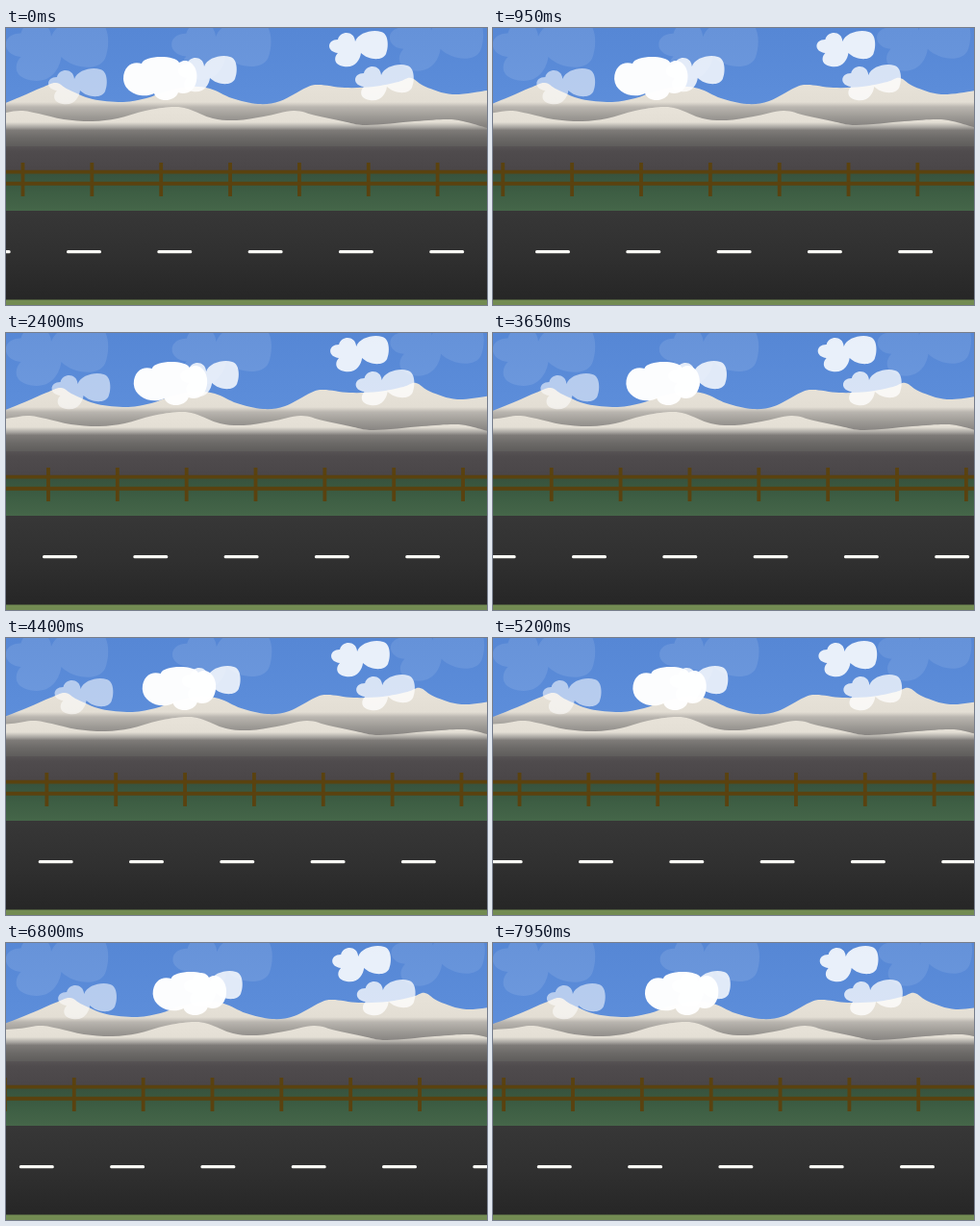
An HTML page that plays this animation: 500x288 px, repeating every 8 s.

```html
<!DOCTYPE html>
<html lang="en">
<head>
<meta charset="utf-8">
<title>Roadside parallax</title>
<style>
html, body { margin: 0; width: 100%; height: 100%; overflow: hidden; background: #2b2b2b; }
svg { display: block; width: 100%; height: 100%; }
</style>
</head>
<body>
<svg viewBox="0 0 500 288" preserveAspectRatio="none">
  <defs>
    <linearGradient id="sky" x2="0" y2="1">
      <stop stop-color="#5687d5"/><stop offset="1" stop-color="#5f90dc"/>
    </linearGradient>
    <linearGradient id="far" gradientUnits="userSpaceOnUse" x1="0" x2="0" y1="50" y2="102">
      <stop stop-color="#e8e3d9"/><stop offset=".52" stop-color="#e3ded4"/>
      <stop offset=".62" stop-color="#b9b5af"/><stop offset=".8" stop-color="#9f9c97"/>
      <stop offset="1" stop-color="#85827f"/>
    </linearGradient>
    <linearGradient id="near" gradientUnits="userSpaceOnUse" x1="0" x2="0" y1="82" y2="124">
      <stop stop-color="#e8e3d9"/><stop offset=".38" stop-color="#e4dfd5"/>
      <stop offset=".5" stop-color="#aaa7a2"/><stop offset=".58" stop-color="#7e7b78"/>
      <stop offset=".78" stop-color="#6b6967"/><stop offset="1" stop-color="#5d5b5a"/>
    </linearGradient>
    <linearGradient id="moor" x2="0" y2="1">
      <stop stop-color="#575354"/><stop offset=".2" stop-color="#4f4b4d"/><stop offset="1" stop-color="#494547"/>
    </linearGradient>
    <linearGradient id="grass" x2="0" y2="1">
      <stop stop-color="#38523d"/><stop offset=".3" stop-color="#3a5a41"/><stop offset="1" stop-color="#456649"/>
    </linearGradient>
    <linearGradient id="road" x2="0" y2="1">
      <stop stop-color="#373737"/><stop offset=".5" stop-color="#303030"/><stop offset="1" stop-color="#262626"/>
    </linearGradient>
    <filter id="soft" x="-20%" y="-60%" width="140%" height="220%"><feGaussianBlur stdDeviation=".7"/></filter>
    <path id="puff" d="M-20-4C-17-13-2-17 7-14C15-12 15 2 12 9C8 17-7 15-14 8C-15 15-20 24-32 22C-43 20-42 12-38 8C-50 7-50-6-38-6C-36-15-21-16-20-4Z"/>
    <path id="bank" d="M141 37C144 28 176 28 180 36C190 29 201 41 198 55C196 66 187 70 179 67C176 77 157 78 154 68C142 74 123 68 122 53C122 39 132 34 141 37Z"/>
  </defs>
  <rect width="500" height="110" fill="url(#sky)"/>
  <g id="haze" fill="#fff"></g>
  <path id="farHills" fill="url(#far)"/>
  <g id="clouds" fill="#fff"></g>
  <path id="nearHills" fill="url(#near)"/>
  <rect y="123" width="500" height="28" fill="url(#moor)"/>
  <rect y="151" width="500" height="39" fill="url(#grass)"/>
  <g fill="#5a420f">
    <g id="posts" filter="url(#soft)"></g>
    <path d="M-5 147.7h510v3.8h-510zM-5 159.7h510v4h-510z" filter="url(#soft)"/>
  </g>
  <rect y="190" width="500" height="93" fill="url(#road)"/>
  <g id="dashes" fill="#f8f8f4" filter="url(#soft)"></g>
  <rect y="282.5" width="500" height="6" fill="#728b52"/>
</svg>
<script>
const LOOP = 8000, STEP = 50;
const POST_GAP = 71.85, DASH_GAP = 94.3;
const byId = id => document.getElementById(id);

function add(parent, tag, attrs) {
  const node = document.createElementNS('http://www.w3.org/2000/svg', tag);
  for (const key in attrs) node.setAttribute(key, attrs[key]);
  return byId(parent).appendChild(node);
}

// Smooth ridge through a few points, closed down to the floor.
function ridge(points, floor) {
  const at = i => points[Math.max(0, Math.min(points.length - 1, i))];
  let d = `M${points[0]}`;
  for (let i = 0; i < points.length - 1; i++) {
    const [a, b, c, e] = [at(i - 1), at(i), at(i + 1), at(i + 2)];
    d += `C${b[0] + (c[0] - a[0]) / 6},${b[1] + (c[1] - a[1]) / 6} ` +
         `${c[0] - (e[0] - b[0]) / 6},${c[1] - (e[1] - b[1]) / 6} ${c}`;
  }
  return `${d}V${floor}H${points[0][0]}Z`;
}

byId('farHills').setAttribute('d', ridge([
  [-40, 89], [-17, 84], [14, 72], [37, 62], [52, 57], [65, 64], [90, 74], [122, 77],
  [146, 73], [166, 66], [190, 61], [212, 63], [235, 73], [262, 79], [285, 76],
  [312, 62], [325, 59], [352, 62], [382, 61], [408, 56], [421, 52], [436, 61],
  [464, 69], [500, 65]], 110));
byId('nearHills').setAttribute('d', ridge([
  [-40, 91], [-8, 89], [15, 86], [34, 89], [60, 95], [90, 97], [116, 94], [145, 86],
  [172, 82], [189, 84], [215, 94], [240, 96], [268, 92], [299, 86], [322, 91],
  [350, 97], [375, 101], [425, 97], [458, 95], [475, 97], [500, 104]], 124));

for (let i = -1; i < 8; i++) {
  add('posts', 'rect', { x: i * POST_GAP - 1.9, y: 140, width: 3.8, height: 35 });
  add('dashes', 'rect', { x: i * DASH_GAP, y: 230.9, width: 36, height: 3.4, rx: 1.5 });
}

// [group, shape, x, y, scale, opacity, px drifted per px of road]
const clouds = [
  ['haze', 'puff', 82, 16, 1.75, .1, 0],
  ['haze', 'puff', 252, 16, 1.7, .1, .0010],
  ['haze', 'puff', 474, 9, 1.6, .09, .0013],
  ['haze', 'puff', 383, 18, 1, .87, .0025],
  ['clouds', 'puff', 91, 57, 1, .56, .0080],
  ['clouds', 'puff', 410, 53, 1, .76, .0014],
  ['clouds', 'puff', 226, 44, 1, .82, .0047],
  ['clouds', 'bank', 0, 0, 1, .98, .0241]
].map(([group, shape, x, y, scale, opacity, drift]) =>
  ({ x, y, scale, drift, node: add(group, 'use', { href: '#' + shape, opacity }) }));

// Time in ms and road distance in px.
const travel = [[0, 0], [950, 169.6], [2400, 446.5], [3650, 679.1],
  [5200, 969], [6800, 1271], [7950, 1491.6]];

function distance(t) {
  const i = Math.max(1, travel.findIndex(knot => knot[0] >= t));
  const [[t0, d0], [t1, d1]] = [travel[i - 1], travel[i]];
  return d0 + (d1 - d0) * (t - t0) / (t1 - t0);
}

const move = (node, x, y = 0, scale = 1) =>
  node.setAttribute('transform', `translate(${x} ${y}) scale(${scale})`);

function draw(now) {
  const d = distance(Math.floor(now % LOOP / STEP) * STEP);
  for (const c of clouds) move(c.node, c.x + d * c.drift, c.y, c.scale);
  move(byId('farHills'), d * .0114);
  move(byId('nearHills'), d * .0165);
  move(byId('posts'), (17.5 + d * .3811) % POST_GAP);
  move(byId('dashes'), (63 + d) % DASH_GAP);
}

const start = performance.now();
function tick() {
  draw(performance.now() - start);
  requestAnimationFrame(tick);
}
tick();
</script>
</body>
</html>
```
